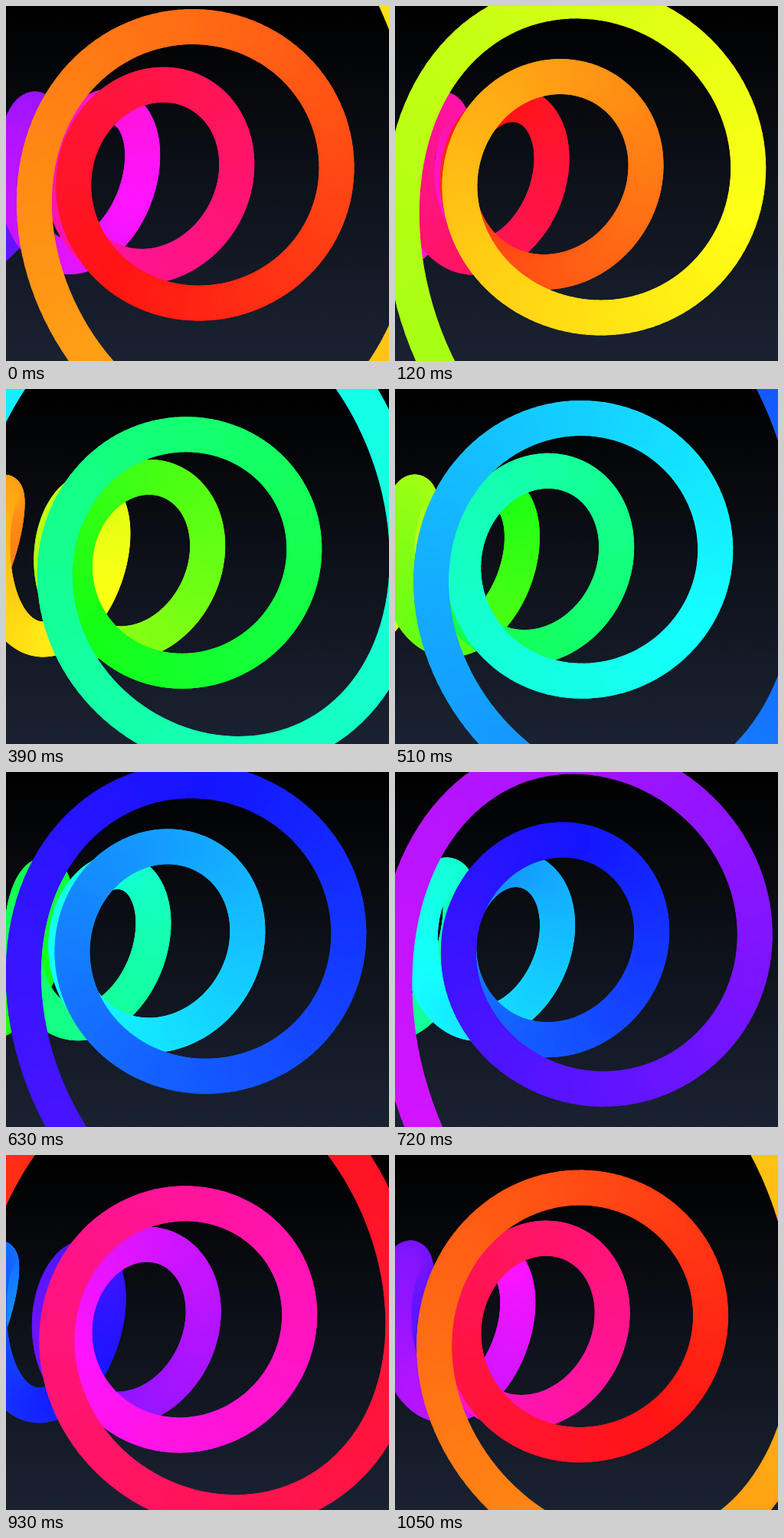
Recreate the animation shown at these times as an HTML page with a canvas. Size 500x463 px, loop 1.08 s.

```html
<!DOCTYPE html>
<html>
<head>
<meta charset="utf-8">
<title>Rainbow coil</title>
<style>
  html, body { margin: 0; width: 100%; height: 100%; overflow: hidden; background: #000; }
  canvas { display: block; width: 100vw; height: 100vh; }
</style>
</head>
<body>
<canvas id="stage" width="500" height="463"></canvas>
<script>
const ctx = document.getElementById('stage').getContext('2d');
const LOOP = 1080, STEP = 30, TAU = 2 * Math.PI;

// Coil axis and height, sampled every half turn from -3 to 3 turns
const AXIS_X = [-190, -82, 0, 60, 111, 155.5, 193.5, 225.3, 252.3, 268.5, 260, 228, 180];
const RADIUS_Y = [96, 96, 96, 96, 97.5, 103, 117.7, 140.5, 178, 250, 415, 580, 760];

// Catmull-Rom interpolation at turn s
function sample(points, s) {
  const u = (s + 3) * 2, i = Math.floor(u), f = u - i;
  const [a, b, c, d] = points.slice(i - 1, i + 3);
  return b + f / 2 * (c - a + f * (2 * a - 5 * b + 4 * c - d + f * (3 * (b - c) + d - a)));
}

function coilPoint(s, phase) {
  const angle = TAU * (s - phase), sin = Math.sin(angle);
  const radiusX = 105.6 * Math.exp(0.522 * s);
  const tilt = 2 - 2 * s;
  const axisY = 230.5 + (s > 0 ? 1.4 * s ** 4 : 0);
  return [
    sample(AXIS_X, s) + radiusX * Math.cos(angle) + tilt * sin,
    axisY - sample(RADIUS_Y, s) * sin
  ];
}

const sky = ctx.createLinearGradient(0, 0, 0, 463);
sky.addColorStop(0, '#000');
sky.addColorStop(1, 'rgb(26,34,50)');

function draw(step) {
  ctx.fillStyle = sky;
  ctx.fillRect(0, 0, 500, 463);
  ctx.lineWidth = 46;
  ctx.lineCap = 'round';
  const phase = step / 3 / TAU, ds = 0.008;
  let from = coilPoint(-2.49, phase);
  // Far end first, so the near turns cover it
  for (let s = -2.49 + ds; s < 2.48; s += ds) {
    const to = coilPoint(s, phase);
    ctx.strokeStyle = `hsl(${336 + 36 * s + 10.2 * step}, 100%, 54%)`;
    ctx.beginPath();
    ctx.moveTo(...from);
    ctx.lineTo(...to);
    ctx.stroke();
    from = to;
  }
}

const start = performance.now();
function tick() {
  const t = Math.max(0, performance.now() - start) % LOOP;
  draw(Math.floor(t / STEP));
  requestAnimationFrame(tick);
}
tick();
</script>
</body>
</html>
```
